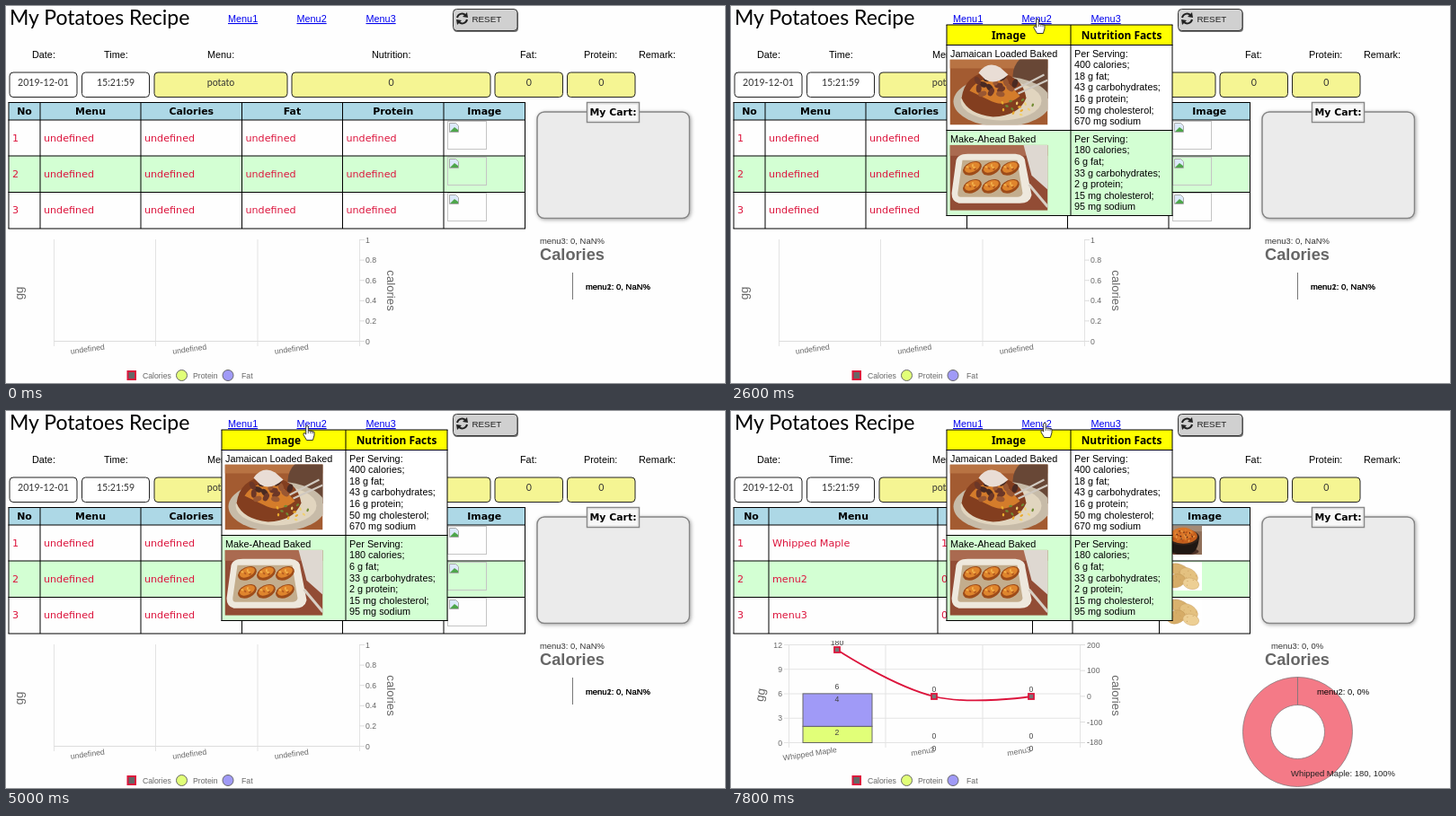
These frames come from a looping animation (800x420 px, 8 s). An HTML page:

```html
<!DOCTYPE html>
<html lang="en">
<head>
<meta charset="utf-8">
<title>My Potatoes Recipe</title>
<style>
html, body { margin: 0; width: 100%; height: 100%; overflow: hidden; background: #fefefe; }
svg { display: block; }
text { font-family: "Liberation Sans", Arial, sans-serif; white-space: pre; }
.hand { font-family: Lato, sans-serif; }
.grid { font-family: "DejaVu Sans", Verdana, sans-serif; }
.head { font-family: "Noto Sans", sans-serif; }
.bold { font-weight: bold; }
.mid { text-anchor: middle; }
.end { text-anchor: end; }
</style>
</head>
<body>
<svg id="stage" width="800" height="420" viewBox="0 0 800 420">
  <defs>
    <clipPath id="pieClip"><rect x="560" y="259" width="220" height="161"/></clipPath>
    <clipPath id="chartClip"><rect y="256" width="450" height="164"/></clipPath>
    <filter id="soft" x="-10%" y="-10%" width="125%" height="125%"><feDropShadow dx="1" dy="1" stdDeviation="2" flood-opacity=".35"/></filter>
  </defs>
  <g id="page"></g><g id="table"></g><g id="charts"></g><g id="popup"></g><g id="cursor"></g>
</svg>
<script>
const LOOP = 8000, STEP = 200, GREEN = '#d3ffd3', RED = '#dc143c';
const layer = id => document.getElementById(id);

const text = (x, y, s, size = 10.85, cls = '', fill = '#000', extra = '') =>
  `<text x="${x}" y="${y}" font-size="${size}" class="${cls}" fill="${fill}" ${extra}>${s}</text>`;
const rect = (x, y, w, h, fill, stroke = 'none', extra = '') =>
  `<rect x="${x}" y="${y}" width="${w}" height="${h}" fill="${fill}" stroke="${stroke}" ${extra}/>`;
const path = (d, fill = 'none', stroke = 'none', width = 1) =>
  `<path d="${d}" fill="${fill}" stroke="${stroke}" stroke-width="${width}"/>`;
const line = (x1, y1, x2, y2, stroke = '#000', width = 1) => path(`M${x1} ${y1}L${x2} ${y2}`, 'none', stroke, width);
const oval = (x, y, rx, ry, fill, stroke = 'none', turn = 0) =>
  `<ellipse cx="${x}" cy="${y}" rx="${rx}" ry="${ry}" fill="${fill}" stroke="${stroke}" transform="rotate(${turn} ${x} ${y})"/>`;
const turned = (x, y, angle, s, size, cls) => text(0, 0, s, size, cls, '#666', `transform="translate(${x} ${y}) rotate(${angle})"`);
const repeat = (n, draw) => Array.from({ length: n }, (_, i) => draw(i)).join('');

function photo(kind, x, y, w = 109, h = 73) {
  return `<svg x="${x}" y="${y}" width="${w}" height="${h}" viewBox="0 0 109 73" preserveAspectRatio="none">${dishes[kind]}</svg>`;
}

// Golden-angle scatter of small dots
const crumbs = (n, x, y, rx, ry, colors, size = 2) => repeat(n, i => {
  const r = Math.sqrt((i + .5) / n), a = i * 2.4;
  return oval((x + rx * r * Math.cos(a)).toFixed(1), (y + ry * r * Math.sin(a)).toFixed(1), size * 1.6, size, colors[i % colors.length], 'none', i * 50);
});

const dishes = {
  mash: rect(0, 0, 109, 73, '#8f6f59') + rect(0, 0, 109, 14, '#a38a76') + path('M0 50L26 42L52 73H0Z', '#c79b88') +
    path('M0 56L34 73M0 65L18 73', 'none', '#8e3c30', 3) + oval(58, 65, 42, 9, '#4b3026') +
    path('M12 29Q16 71 41 71H75Q98 67 101 29Z', '#201713') + oval(56.5, 29, 45, 20, '#33231b') +
    oval(56, 26, 40, 19, '#c55f1d') + oval(55, 19, 30, 15, '#d77428') +
    crumbs(26, 56, 25, 34, 15, ['#ea9843', '#b84f16', '#df7e2c']) + crumbs(9, 57, 23, 27, 12, ['#572817'], 1.5),
  hasselback: rect(0, 0, 109, 73, '#d1ccc4') + oval(54, 37, 58, 37, '#e7e3dc') + oval(54, 37, 47, 30, '#d9d3c9') +
    path('M10 14Q18 2 37 12L63 30Q66 44 51 46Q24 40 10 14Z', '#7d231e') +
    path('M35 50Q32 33 55 29L93 26Q105 36 92 51Q61 70 42 62Z', '#8b2923') +
    repeat(11, i => path(`M${15 + i * 4} ${12 + i * 2.1}q8 7 2 15`, 'none', i % 2 ? '#cf6e59' : '#a5362b', 2.2)) +
    repeat(13, i => path(`M${40 + i * 4.3} ${38 - i * .8}q9 8 2 19`, 'none', i % 2 ? '#d57b65' : '#aa382e', 2.2)) +
    crumbs(12, 51, 40, 40, 24, ['#5d2019', '#b66043'], 1.3),
  loaded: rect(0, 0, 109, 73, '#a35b31') + rect(0, 0, 109, 10, '#b87343') + oval(100, 18, 30, 27, '#684736') +
    oval(58, 47, 54, 28, '#c7bba8') + oval(57, 46, 45, 22, '#e1d5bf') +
    path('M13 43Q17 16 46 13Q81 16 85 43Q77 63 48 64Q20 61 13 43Z', '#833e1f') +
    path('M22 35Q34 16 62 23L78 41Q60 55 43 45Z', '#d47c2b') +
    crumbs(16, 50, 29, 25, 12, ['#6c3727', '#492a22', '#9a5732'], 3) +
    path('M32 15Q42 1 56 9L65 17Q50 30 39 22Z', '#e9ddd5') + path('M72 34L105 17M76 38L109 23', 'none', '#d0c9c0', 2) +
    crumbs(14, 74, 53, 19, 10, ['#e9aa2e', '#718c33', '#efd174'], 1.2),
  baked: rect(0, 0, 109, 73, '#924c35') + rect(0, 0, 109, 12, '#aa6a50') + path('M82 0H109V50L91 34Z', '#ded8d1') +
    path('M7 17Q9 10 20 10H73Q84 11 84 20L91 56Q89 65 78 65H10Q2 63 2 54Z', '#eee8dd') +
    path('M14 17H75L81 54Q80 58 75 58H12Q8 58 9 52Z', '#c3ad8d') +
    repeat(6, i => {
      const x = 25 + i % 3 * 21, y = 26 + (i > 2) * 20;
      return oval(x, y, 11, 7, '#9e4c19', 'none', -25) + oval(x, y - 1, 9, 5, '#df852d', 'none', -25) + crumbs(5, x, y - 1, 6, 3, ['#f2b14b', '#b55c20'], 1);
    }) + path('M88 44L109 69', 'none', '#d8d0c5', 3),
  soup: rect(0, 0, 109, 73, '#44464a') + path('M0 13L31 0H58L0 39Z', '#5c5e61') + path('M0 54L36 73H0Z', '#686663') +
    oval(60, 40, 40, 34, '#242628') + oval(61, 36, 39, 32, '#54504b') + oval(61, 35, 34, 27, '#bc691a') + oval(60, 33, 29, 22, '#d18324') +
    path('M46 36Q58 27 76 37M56 43Q58 31 66 27', 'none', '#476225', 2.5) + crumbs(11, 60, 35, 13, 9, ['#55772c', '#2e4c22'], 2) +
    crumbs(10, 17, 17, 13, 10, ['#477035', '#678b43'], 2.4) + oval(17, 55, 10, 9, '#78913c') + oval(17, 54, 8, 7, '#aebc65') + path('M85 12L109 0', 'none', '#aaa59b', 4),
  pie: rect(0, 0, 109, 73, '#938a80') + rect(0, 0, 109, 17, '#706861') + path('M69 0H109V43Q87 37 72 15Z', '#ae5041') +
    path('M76 3L106 35M91 0L109 22', 'none', '#d2a091', 2) + oval(19, 13, 19, 11, '#d7d1c7') + oval(51, 49, 51, 25, '#5f5047') +
    path('M3 35Q9 69 32 71H68Q92 68 99 35Z', '#dfd5c5') + oval(51, 35, 48, 24, '#c69968') + oval(51, 34, 40, 20, '#805030') +
    crumbs(42, 51, 33, 36, 17, ['#b07a49', '#65391f', '#c89762']) + path('M49 44L67 64L27 62Z', '#55311f') + path('M27 62L67 64L70 70H33Z', '#d4c6b2'),
  potato: rect(0, 0, 109, 73, '#fff') + oval(46, 21, 31, 15, '#d9b16d', '#b98f50', 18) + oval(72, 34, 27, 17, '#e4c180', '#c49a5d', 28) +
    oval(36, 48, 26, 17, '#d6ac67', '#b98f50', -12) + oval(78, 55, 23, 14, '#edcf94', '#c49a5d', 12) + crumbs(14, 57, 40, 37, 22, ['#c59a58'], 1)
};

const menus = [
  { divider: 379.5, rows: [['Whipped Maple', 'mash', [180, 4, 38, 2, 0, 260]], ['Maple-Bacon Hasselback', 'hasselback', [220, 8, 33, 4, 20, 380]]] },
  { divider: 378, rows: [['Jamaican Loaded Baked', 'loaded', [400, 18, 43, 16, 50, 670]], ['Make-Ahead Baked', 'baked', [180, 6, 33, 2, 15, 95]]] },
  { divider: 372, rows: [['Sweet Potato Soup', 'soup', [360, 20, 40, 4, 0, 700]], ['Sweet Potato Pie', 'pie', [445, 19, 63, 8, 54, 320]]] }
];
const units = [' calories;', ' g fat;', ' g carbohydrates;', ' g protein;', ' mg cholesterol;', ' mg sodium'];

function drawPage() {
  const links = [247, 323.5, 400.5].map((x, i) => text(x, 18, 'Menu' + (i + 1), 10.85, '', '#0000ee', 'text-decoration="underline"'));
  const labels = [['Date:', 29], ['Time:', 109], ['Menu:', 224], ['Nutrition:', 407], ['Fat:', 572], ['Protein:', 643], ['Remark:', 704]];
  const fields = [[4, 75, '2019-12-01'], [84.5, 75, '15:21:59'], [165, 148, 'potato'], [318, 221, '0'], [544, 75.5, '0'], [624.5, 75.5, '0']];
  return text(4, 21, 'My Potatoes Recipe', 23, 'hand') + links.join('') +
    rect(498, 5, 72, 24, '#777', 'none', 'rx="4"') + rect(497.5, 3.5, 71.5, 24, '#d0d0d0', '#333', 'rx="4"') +
    path('M502 13A5.5 5.5 0 0 1 511 10M513 15A5.5 5.5 0 0 1 504 18', 'none', '#222', 2) + path('M508 12L514 13L513 7ZM507 16L501 15L502 21Z', '#222') +
    text(518.5, 18, 'RESET', 9.8, '', '#222') +
    labels.map(([s, x]) => text(x, 58, s)).join('') +
    fields.map(([x, w, s], i) => rect(x, 74, w, 27.5, i < 2 ? '#fff' : '#f5f593', '#222', 'rx="4"') + text(x + w / 2, 89, s, 10.6, 'hand mid', '#333')).join('') +
    rect(591, 118, 169.5, 118.5, '#ebebeb', '#858585', 'rx="8" stroke-width="1.5" filter="url(#soft)"') +
    rect(646.5, 107.5, 58, 22, '#f8f8f8', '#888', 'stroke-width="1.5"') + rect(648, 109, 55, 19, 'none', '#ddd') + text(675.5, 122, 'My Cart:', 10.9, 'grid bold mid');
}

function brokenImage(y) {
  return rect(491.5, y + .5, 43, 31, 'none', '#c4c4c4') + path(`M493.5 ${y + 2.5}h7l3 3v7h-10Z`, '#dce9fb', '#aaa') + path(`M494 ${y + 12}l5 -5l4 3v2Z`, '#4ea64b');
}

function drawTable(filled, potatoes) {
  const cols = filled ? [3, 42, 230, 335.5, 380, 476.5, 577.5] : [3, 38, 150, 262.5, 374.5, 487, 577.5];
  const tops = [107.5, 127, 167, 207.5, 248];
  const data = filled ? [['Whipped Maple', 180, 4, 2], ['menu2', 0, 0, 0], ['menu3', 0, 0, 0]] : Array(3).fill(Array(4).fill('undefined'));
  let out = rect(3, 107.5, 574.5, 19.5, '#add8e6') + rect(3, 167, 574.5, 40.5, GREEN);
  out += tops.map(y => line(2.5, y, 578, y)).join('') + cols.map(x => line(x, 107.5, x, 248)).join('');
  out += ['No', 'Menu', 'Calories', 'Fat', 'Protein', 'Image'].map((s, i) => text((cols[i] + cols[i + 1]) / 2, 121, s, 10.95, 'grid bold mid')).join('');
  data.forEach((row, r) => {
    const y = 151 + r * 40.2;
    out += [r + 1, ...row].map((s, i) => text(cols[i] + 4, y, s, 11.15, 'grid', RED)).join('');
    const top = 128 + r * 40.2;
    if (!filled) out += brokenImage(Math.round(top));
    else if (r === 0) out += photo('mash', 481, top, 43, 32);
    else if (potatoes) out += photo('potato', 481, top, 43, 32);
  });
  return out;
}

const marker = (x, y) => rect(x - 3, y - 3, 6, 6, '#777', RED, 'stroke-width="1.8"');
const small = (x, y, s, cls = '') => text(x, y, s, 8.7, cls, '#666');

function legend() {
  return rect(135.5, 407, 8.5, 9, '#666', RED, 'stroke-width="2"') + oval(195.5, 411.5, 6, 6, '#e1ff78', '#666') + oval(247, 411.5, 6, 6, '#a09af7', '#666') +
    small(152, 414.5, 'Calories') + small(208, 414.5, 'Protein') + small(262, 414.5, 'Fat');
}

function emptyCharts() {
  const grid = [53.5, 166.5, 280, 393.5].map(x => line(x, 260, x, 379, '#e3e3e3')).join('') + line(53, 373.5, 399, 373.5, '#ddd');
  const ticks = repeat(6, i => line(393, 260.5 + i * 22.6, 399, 260.5 + i * 22.6, '#ddd') + small(400, 263.5 + i * 22.6, (10 - 2 * i) / 10));
  const names = [110, 223.5, 337].map(x => turned(x, 382.5, -8, 'undefined', 8.7, 'end')).join('');
  const pie = text(594, 264.5, 'menu3: 0, NaN%', 9.45, '', '#333') + line(630.5, 297, 630.5, 327, '#777') +
    [1, 2].map(i => text(645, 316, `menu${i}: 0, NaN%`, 9.45)).join('');
  return grid + ticks + names + turned(19, 320, -90, 'gg', 13.2, 'mid') + turned(424, 317, 90, 'calories', 13.2, 'mid') + pieFrame(pie);
}

function pieFrame(body) {
  return `<g clip-path="url(#pieClip)">${body}</g>` + text(630, 283, 'Calories', 18.2, 'bold mid', '#666');
}

function ring(share) {
  const a = Math.min(share, .9999) * 2 * Math.PI, big = share > .5 ? 1 : 0;
  const at = r => `${630.5 + r * Math.sin(a)} ${357.5 - r * Math.cos(a)}`;
  return path(`M630.5 296.5A61 61 0 ${big} 1 ${at(61)}L${at(30)}A30 30 0 ${big} 0 630.5 327.5Z`, '#f47a87', '#87777a', .8);
}

function filledCharts(p) {
  const base = 369.5, y0 = 318, up = n => base - n * 9.1 * p, peak = y0 - 52 * p;
  let out = [64.5, 172, 280, 388.5].map(x => line(x, 260, x, 375, '#e3e3e3')).join('');
  out += repeat(5, i => line(59, 260.5 + i * 27.25, 388, 260.5 + i * 27.25, '#e3e3e3') + small(57, 263.5 + i * 27.25, 12 - 3 * i, 'end'));
  out += [200, 100, 0, -100, -180].map(v => {
    const y = 260.5 + (200 - v) * .2868;
    return line(388, y, 394, y, '#ddd') + small(396, y + 3, v);
  }).join('');
  out += rect(80, up(2), 77, base - up(2), '#e1ff78', '#666') + rect(80, up(6), 77, up(2) - up(6), '#a09af7', '#666');
  out += path(`M118 ${peak}C118 ${peak} 180.6 ${y0 - 11 * p} 226 ${y0}C267 ${y0 + 10 * p} 334 ${y0} 334 ${y0}`, 'none', RED, 1.8);
  out += marker(118, peak) + marker(226, y0) + marker(334, y0);
  const values = [[118, peak - 5, 180], [118, up(6) - 5, 6], [118, up(6) + 9.5, 4], [118, up(2) + 9.5, 2]];
  [226, 334].forEach(x => values.push([x, 312.5, 0], [x, 364.5, 0], [x, 379, 0]));
  out += values.map(([x, y, s]) => text(x, y, s, 8.7, 'mid', '#444')).join('');
  out += turned(118, 380, -9, 'Whipped Maple', 8.7, 'end') + turned(227, 380, -9, 'menu2', 8.7, 'end') + turned(334, 380, -9, 'menu3', 8.7, 'end');
  out += turned(37, 317, -80, 'gg', 13.2, 'mid') + turned(424, 317, 90, 'calories', 13.2, 'mid');
  const pie = ring(p) + text(630, 264.5, 'menu3: 0, 0%', 9.45, 'mid', '#333') + text(652, 316, 'menu2: 0, 0%', 9.45) + text(623, 407, 'Whipped Maple: 180, 100%', 9.45, '', '#222');
  return `<g clip-path="url(#chartClip)">${out}</g>` + pieFrame(pie);
}

function drawPopup({ divider, rows }) {
  let out = rect(240, 21, 251, 213, '#fff') + rect(240, 21, 251, 22.5, '#ffff00') + rect(240, 138.5, 251, 95, GREEN);
  out += text((240 + divider) / 2, 37, 'Image', 11.9, 'head bold mid') + text((divider + 491) / 2, 37, 'Nutrition Facts', 11.9, 'head bold mid');
  rows.forEach(([name, dish, facts], r) => {
    const y = 56.5 + r * 95.3;
    out += text(244, y, name) + photo(dish, 243.5, y + 3);
    out += ['Per Serving:', ...facts.map((n, i) => n + units[i])].map((s, i) => text(divider + 4, y + i * 12.6, s)).join('');
  });
  return out + [21, 43.5, 138.5, 233.5].map(y => line(239.5, y, 491.5, y)).join('') + [240, divider, 491].map(x => line(x, 21, x, 234)).join('');
}

const pointers = {
  arrow: path('M0 0V11L2.7 8.6L4.5 12.7L6.4 11.8L4.6 7.9H8Z', '#fff', '#222', .9),
  hand: path('M-1.3 1Q0 -.6 1.3 1V6L4 6.2L8 7.3V11L6.4 16.5H-.5L-4 10.5Q-4.5 8.3 -2.8 8.6L-1.3 10Z', '#fff', '#222', .9) + path('M1.3 6V9M3.8 6.5V9M6 7V9.3', 'none', '#222', .7)
};

// time, x, y, open menu (0 = none)
const track = [
  [600, 285, 1, 0], [800, 273, 8, 0], [1000, 264, 14, 1], [1400, 266, 15, 1], [1800, 320, 15, 2], [2200, 339, 14, 2],
  [2800, 342, 14, 2], [3200, 402, 15, 3], [3800, 411, 15, 3], [4400, 388, 17, 3], [4600, 352, 16, 2], [5000, 335, 16, 2],
  [5200, 275, 15, 1], [5600, 266, 16, 1], [5800, 267, 23, 1], [6200, 288, 78, 1], [6400, 290, 80, 0], [6600, 290, 80, 0],
  [6800, 302, 60, 0], [7000, 325, 32, 0], [7200, 340, 13, 2], [7800, 349, 13, 2], [8000, 349, 13, 2]
];

function cursorAt(t) {
  const i = track.findLastIndex(k => k[0] <= t);
  if (i < 0) return null;
  const a = track[i], b = track[i + 1] || a, f = (t - a[0]) / (b[0] - a[0] || 1);
  return { x: a[1] + (b[1] - a[1]) * f, y: a[2] + (b[2] - a[2]) * f, menu: a[3] };
}

const shown = {};
function show(id, key, draw) {
  if (shown[id] === key) return;
  shown[id] = key;
  layer(id).innerHTML = draw();
}

function render(t) {
  const filled = t >= 6400, charted = t >= 6800;
  const grow = 1 - Math.pow(1 - Math.min(1, Math.max(0, (t - 6650) / 1000)), 4);
  const cursor = cursorAt(t), menu = cursor ? cursor.menu : 0;
  show('table', `${filled}${charted}`, () => drawTable(filled, charted));
  show('charts', charted ? grow : 'empty', () => (charted ? filledCharts(grow) : emptyCharts()) + legend());
  show('popup', menu, () => menu ? drawPopup(menus[menu - 1]) : '');
  show('cursor', t, () => cursor ? `<g transform="translate(${cursor.x} ${cursor.y})">${pointers[menu ? 'hand' : 'arrow']}</g>` : '');
}

layer('page').innerHTML = drawPage();
const start = performance.now();
function tick() {
  const t = (performance.now() - start) % LOOP;
  render(Math.floor(t / STEP) * STEP);
  requestAnimationFrame(tick);
}
tick();
</script>
</body>
</html>
```
